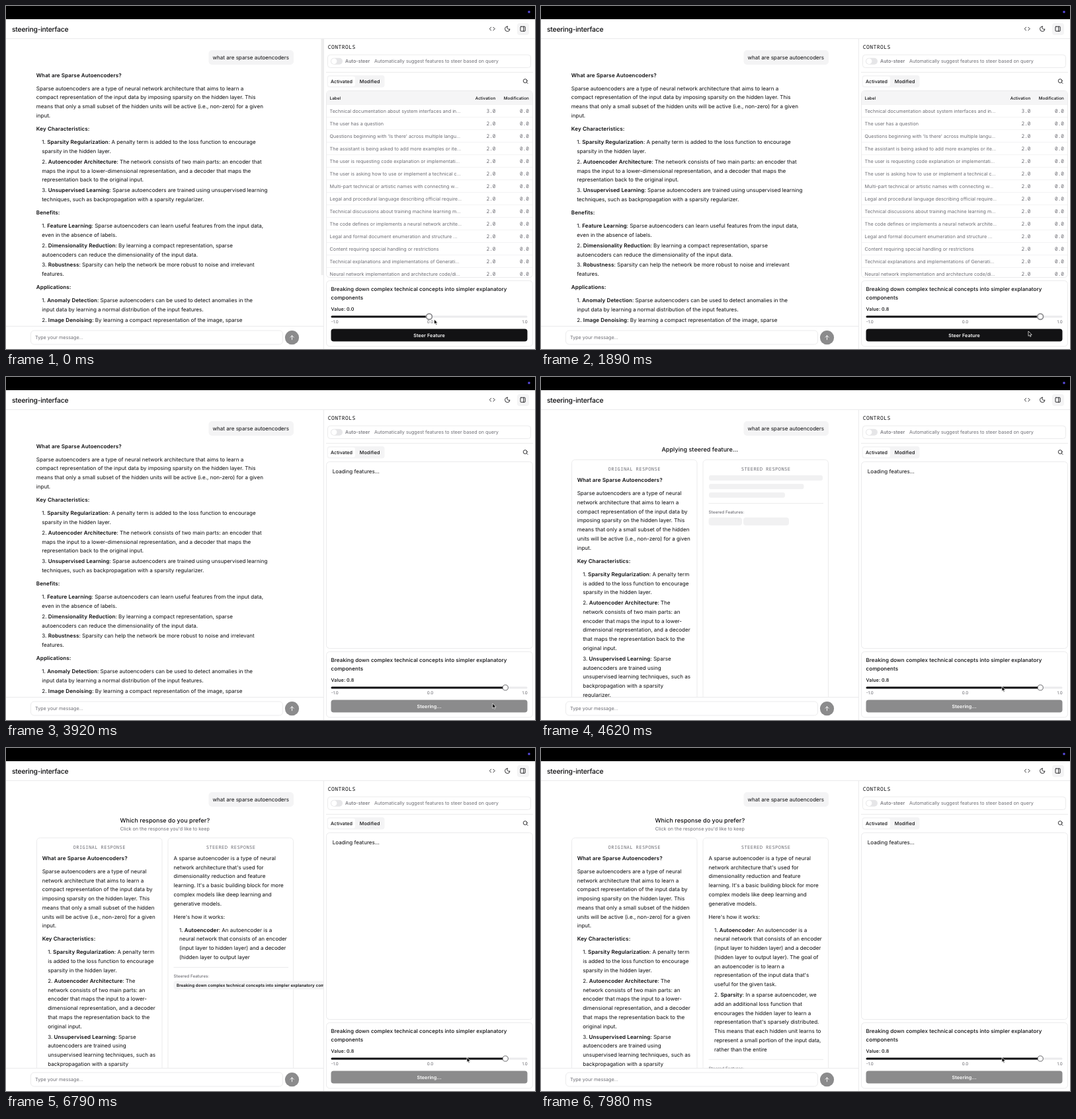
An HTML page that plays this animation: 800 by 520 pixels, repeating every 8 s.

```html
<!DOCTYPE html>
<html lang="en">
<head>
<meta charset="utf-8">
<title>steering-interface</title>
<style>
  html, body { margin: 0; width: 100%; height: 100%; overflow: hidden; background: #fff; }
  svg { display: block; width: 800px; height: 520px; }
  text { font-family: Inter, "Open Sans", sans-serif; white-space: pre; text-rendering: geometricPrecision; }
  .mono { font-family: "Noto Sans Mono", "Liberation Mono", monospace; }
  .line { fill: none; stroke: #ebebec; }
  .icon { fill: none; stroke: #18181b; stroke-width: .9; stroke-linecap: round; stroke-linejoin: round; }
  .soft { fill: #f4f4f5; }
  .bone { fill: #f1f1f2; }
</style>
</head>
<body>
<svg viewBox="0 0 800 520">
  <defs>
    <clipPath id="chatClip"><rect y="50" width="480" height="435.5"/></clipPath>
    <clipPath id="tableClip"><rect x="485" y="128" width="311" height="282.5"/></clipPath>
  </defs>
  <rect width="800" height="520" fill="#fff"/>
  <rect width="800" height="20"/>
  <circle cx="791" cy="9" r="1.8" fill="#5a4be0"/>
  <path class="line" d="M0 49.5H800M480.5 50V520M0 485.5H480M484 100.5H797"/>

  <rect class="soft" x="773" y="26" width="18" height="18" rx="4"/>
  <g class="icon">
    <path d="M733.6 32.2 731.2 34.6 733.6 37M736.8 32.2 739.2 34.6 736.8 37"/>
    <path d="M758.3 31.1A2.7 2.7 0 0 0 762 34.9 3.7 3.7 0 1 1 758.3 31.1Z"/>
    <rect x="778" y="31.2" width="7.2" height="7" rx=".8"/>
    <path d="M782.8 31.2V38.2"/>
    <circle cx="785.2" cy="113.6" r="2.9"/>
    <path d="M787.4 115.8 789 117.4"/>
  </g>

  <g id="chat" clip-path="url(#chatClip)">
    <rect id="edge" x="476.5" y="50" width="3.5" height="358" fill="#ededed"/>
    <rect class="soft" x="306.5" y="67" width="128.5" height="22" rx="5"/>
    <g id="single"></g>
    <g id="compare">
      <g id="cards">
        <rect class="line" x="46.5" y="125.5" width="189.5" height="500" rx="5"/>
        <rect class="line" x="245" y="125.5" width="189.5" height="500" rx="5"/>
      </g>
      <g id="skeleton">
        <rect class="bone" x="254" y="149" width="172" height="8" rx="3"/>
        <rect class="bone" x="254" y="162" width="143.5" height="8" rx="3"/>
        <rect class="bone" x="254" y="175" width="115" height="8" rx="3"/>
        <path class="line" d="M253.5 191.5H427"/>
        <rect class="bone" x="253.5" y="213" width="50.5" height="12" rx="4"/>
        <rect class="bone" x="306" y="213" width="69" height="12" rx="4"/>
      </g>
      <g id="answer">
        <g id="stream"></g>
        <g id="foot">
          <path class="line" d="M253.5 15.5H427"/>
          <rect class="soft" x="253.5" y="36" width="260" height="13" rx="4"/>
        </g>
      </g>
    </g>
  </g>
  <rect class="line" x="37.5" y="492" width="381" height="21" rx="5"/>
  <circle cx="432.5" cy="502.7" r="10.6" fill="#8b8b8c"/>
  <path d="M432.5 505.8V499.8M429.9 502.3 432.5 499.7 435.1 502.3" fill="none" stroke="#fff" stroke-width=".9" stroke-linecap="round"/>

  <g id="panel">
    <rect class="line" x="486.5" y="74" width="307" height="19.5" rx="4"/>
    <rect x="491" y="78.7" width="18" height="10" rx="5" fill="#e6e6e8"/>
    <circle cx="496.2" cy="83.7" r="4.2" fill="#fff"/>
    <rect class="soft" x="485.5" y="105" width="87" height="18.5" rx="4"/>
    <rect x="487" y="106.7" width="41" height="15" rx="3" fill="#fff"/>
    <rect class="line" x="484.5" y="128.5" width="312" height="283" rx="5"/>
    <g id="table" clip-path="url(#tableClip)">
      <rect x="485" y="129" width="311" height="20" fill="#f5f5f6"/>
    </g>
    <g id="loading"></g>
    <rect class="line" x="484.5" y="416.5" width="312" height="99.5" rx="5"/>
    <rect x="491.5" y="469.4" width="297" height="3" rx="1.5" fill="#ebebed"/>
    <rect id="fill" x="491.5" y="469.4" height="3" rx="1.5" fill="#121214"/>
    <circle id="halo" cy="470.9" r="5.4" fill="#b9b9bc"/>
    <circle id="thumb" cy="470.9" r="4.1" fill="#fff" stroke="#4a4a4d" stroke-width=".8"/>
    <rect id="button" x="491.5" y="489.5" width="297" height="19" rx="4"/>
  </g>
  <path id="cursor" d="M0 0V7.4L1.7 5.8 2.8 8.4 4.1 7.9 3 5.4H5.3Z" stroke="#fff" stroke-width=".7"/>
</svg>
<script>
const $ = id => document.getElementById(id);
const NS = 'http://www.w3.org/2000/svg';
const INK = '#0c0c0e', GRAY = '#6c6c73';
const BODY = 8.05, SMALL = 7.18, TINY = 6.27;
const LOOP = 8000, STEP = 70;

const make = (parent, tag, attrs) => {
  const el = document.createElementNS(NS, tag);
  for (const k in attrs) el.setAttribute(k, attrs[k]);
  return parent.appendChild(el);
};

const MED = { 'font-weight': 500, 'letter-spacing': '.008em' };
const BOLD = { 'font-weight': 600, 'letter-spacing': '.013em' };
const MID = { 'text-anchor': 'middle' };
const END = { 'text-anchor': 'end' };
const MONO = { class: 'mono' };
const WIDE = { ...MONO, 'letter-spacing': '.05em' };

// Parts between ** are bold.
const setText = (el, str) => {
  el.textContent = '';
  str.split('**').forEach((part, i) => {
    if (part) make(el, 'tspan', i % 2 ? BOLD : {}).textContent = part;
  });
};

// y is the middle of the capitals.
const label = (parent, x, y, str, size = BODY, fill = INK, extra = {}) => {
  const el = make(parent, 'text', { x, y: y + size * .36, 'font-size': size, fill, ...extra });
  setText(el, str);
  return el;
};

// Blocks are "kind|line|line"; list items are indented and set closer.
const flow = (x, y, blocks) => {
  const out = [];
  let before = '';
  for (const block of blocks) {
    const [kind, ...lines] = block.split('|');
    if (before) y += kind === 'li' && before === 'li' ? 15.9 : 20.1;
    lines.forEach((str, i) => {
      if (i) y += 13.75;
      out.push({ x: kind === 'li' ? x + 8.5 : x, y, str });
    });
    before = kind;
  }
  return out;
};
const write = (parent, lines) => lines.map(l => label(parent, l.x, l.y, l.str));

const wideAnswer = [
  'h|**What are Sparse Autoencoders?**',
  'p|Sparse autoencoders are a type of neural network architecture that aims to learn a|compact representation of the input data by imposing sparsity on the hidden layer. This|means that only a small subset of the hidden units will be active (i.e., non-zero) for a given|input.',
  'h|**Key Characteristics:**',
  'li|1. **Sparsity Regularization**: A penalty term is added to the loss function to encourage|sparsity in the hidden layer.',
  'li|2. **Autoencoder Architecture**: The network consists of two main parts: an encoder that|maps the input to a lower-dimensional representation, and a decoder that maps the|representation back to the original input.',
  'li|3. **Unsupervised Learning**: Sparse autoencoders are trained using unsupervised learning|techniques, such as backpropagation with a sparsity regularizer.',
  'h|**Benefits:**',
  'li|1. **Feature Learning**: Sparse autoencoders can learn useful features from the input data,|even in the absence of labels.',
  'li|2. **Dimensionality Reduction**: By learning a compact representation, sparse|autoencoders can reduce the dimensionality of the input data.',
  'li|3. **Robustness**: Sparsity can help the network be more robust to noise and irrelevant|features.',
  'h|**Applications:**',
  'li|1. **Anomaly Detection**: Sparse autoencoders can be used to detect anomalies in the|input data by learning a normal distribution of the input features.',
  'li|2. **Image Denoising**: By learning a compact representation of the image, sparse'
];
const narrowAnswer = [
  'h|**What are Sparse Autoencoders?**',
  'p|Sparse autoencoders are a type of neural|network architecture that aims to learn a|compact representation of the input data by|imposing sparsity on the hidden layer. This|means that only a small subset of the hidden|units will be active (i.e., non-zero) for a given|input.',
  'h|**Key Characteristics:**',
  'li|1. **Sparsity Regularization**: A penalty term|is added to the loss function to encourage|sparsity in the hidden layer.',
  'li|2. **Autoencoder Architecture**: The|network consists of two main parts: an|encoder that maps the input to a lower-|dimensional representation, and a decoder|that maps the representation back to the|original input.',
  'li|3. **Unsupervised Learning**: Sparse|autoencoders are trained using|unsupervised learning techniques, such as|backpropagation with a sparsity|regularizer.'
];
const steeredAnswer = [
  "p|A sparse autoencoder is a type of neural|network architecture that's used for|dimensionality reduction and feature|learning. It's a basic building block for more|complex models like deep learning and|generative models.",
  "p|Here's how it works:",
  "li|1. **Autoencoder**: An autoencoder is a|neural network that consists of an encoder|(input layer to hidden layer) and a decoder|(hidden layer to output layer). The goal of|an autoencoder is to learn a|representation of the input data that's|useful for the given task.",
  "li|2. **Sparsity**: In a sparse autoencoder, we|add an additional loss function that|encourages the hidden layer to learn a|representation that's sparsely distributed.|This means that each hidden unit learns to|represent a small portion of the input data,|rather than the entire"
];
const features = [
  'Technical documentation about system interfaces and in...',
  'The user has a question',
  "Questions beginning with 'Is there' across multiple langu...",
  'The assistant is being asked to add more examples or ite...',
  'The user is requesting code explanation or implementati...',
  'The user is asking how to use or implement a technical c...',
  'Multi-part technical or artistic names with connecting w...',
  'Legal and procedural language describing official require...',
  'Technical discussions about training machine learning m...',
  'The code defines or implements a neural network archite...',
  'Legal and formal document enumeration and structure ...',
  'Content requiring special handling or restrictions',
  'Technical explanations and implementations of Generati...',
  'Neural network implementation and architecture code/di...'
];

// Header and chat
const stage = document.querySelector('svg');
label(stage, 9, 34.8, 'steering-interface', 10.35, INK, { ...MED, 'letter-spacing': '-.022em' });
label(stage, 44, 502.5, 'Type your message...', SMALL, GRAY);
label($('chat'), 312.5, 78.2, 'what are sparse autoencoders');
write($('single'), flow(45.8, 104.7, wideAnswer));

const applying = label($('compare'), 240.3, 109.5, 'Applying steered feature...', 8.95, INK, { ...MED, ...MID });
label($('answer'), 240.3, 109.5, 'Which response do you prefer?', 8.95, INK, { ...MED, ...MID });
label($('answer'), 240.3, 122.3, "Click on the response you'd like to keep", SMALL, GRAY, MID);
label($('cards'), 101.6, 139.5, 'ORIGINAL RESPONSE', SMALL, GRAY, WIDE);
label($('cards'), 302.8, 139.5, 'STEERED RESPONSE', SMALL, GRAY, WIDE);
write($('cards'), flow(54.7, 156.1, narrowAnswer));
label($('skeleton'), 253.5, 204.6, 'Steered Features:', TINY, GRAY, MED);
label($('foot'), 253.5, 28.5, 'Steered Features:', TINY, GRAY, MED);
label($('foot'), 258, 42.6, '**Breaking down complex technical concepts into simpler explanatory components**', 6.2);

const streamLines = flow(253.5, 166.9, steeredAnswer);
const streamTexts = write($('stream'), streamLines);

// Controls
const panel = $('panel');
label(panel, 486.8, 62.6, 'CONTROLS', BODY, INK, WIDE);
label(panel, 513, 83.6, 'Auto-steer', SMALL, GRAY, MED);
label(panel, 557, 83.6, 'Automatically suggest features to steer based on query', SMALL, GRAY);
label(panel, 491, 114.2, 'Activated', SMALL, INK, MED);
label(panel, 534.8, 114.2, 'Modified', SMALL, INK, MED);
label($('loading'), 493.7, 143.5, 'Loading features...');
label($('table'), 489.6, 139.3, 'Label', TINY, INK, MED);
label($('table'), 740.3, 139.3, 'Activation', TINY, INK, { ...MED, ...END });
label($('table'), 790.8, 139.3, 'Modification', TINY, INK, { ...MED, ...END });
features.forEach((name, i) => {
  const y = 159.4 + 19 * i;
  make($('table'), 'path', { d: `M485 ${y - 9.9}H796`, stroke: '#f3f3f4' });
  label($('table'), 489.6, y, name, SMALL, GRAY);
  label($('table'), 740.5, y, i ? '2.0' : '3.0', 7.8, GRAY, { ...MONO, ...END });
  label($('table'), 791, y, '0.0', 7.8, GRAY, { ...MONO, ...END });
});
label(panel, 491.5, 429.2, 'Breaking down complex technical concepts into simpler explanatory', BODY, INK, MED);
label(panel, 491.5, 442, 'components', BODY, INK, MED);
const valueText = label(panel, 491.5, 459.6, 'Value: 0.0', SMALL, INK, MED);
label(panel, 491.8, 479.2, '-1.0', TINY, GRAY);
label(panel, 641.5, 479.2, '0.0', TINY, GRAY, MID);
label(panel, 788.6, 479.2, '1.0', TINY, GRAY, END);
const buttonText = label(panel, 640, 499, 'Steer Feature', SMALL, '#fff', { ...BOLD, ...MID });

// Timeline
const GRAB = 280, RELEASE = 1540, CLICK = 2450, APPLY = 4200, ANSWER = 5530;
const cursorPath = [
  [0, 647.5, 475], [GRAB, 640, 470], [840, 735, 470], [910, 734, 470], [1050, 734, 470],
  [RELEASE, 755, 470], [1610, 755, 470], [1890, 737, 493], [2240, 736, 494.7],
  [3850, 736, 494.7], [3990, 735.5, 495], [4130, 735.5, 495], [4550, 697, 469], [LOOP, 697, 469]
];
const wordPath = [[ANSWER, 1], [5880, 18], [6790, 63], [7980, 127], [LOOP, 127]];

const at = (path, t) => {
  let i = 1;
  while (i < path.length - 1 && path[i][0] < t) i++;
  const a = path[i - 1], b = path[i];
  const k = Math.min(1, Math.max(0, (t - a[0]) / (b[0] - a[0])));
  return a.slice(1).map((v, j) => v + (b[j + 1] - v) * k);
};
const show = (el, on) => el.setAttribute('display', on ? 'inline' : 'none');

const drawStream = t => {
  let left = Math.round(at(wordPath, t)[0]);
  let last = streamLines[0].y;
  streamLines.forEach((line, i) => {
    const words = line.str.split(' ');
    let str = words.slice(0, Math.max(0, left)).join(' ');
    // A closing bracket arrives together with the word after it.
    if (left > 0 && left < words.length) str = str.replace(/\)\.$/, '');
    if (left > 0) last = line.y;
    left -= words.length;
    setText(streamTexts[i], str);
  });
  $('foot').setAttribute('transform', `translate(0 ${last})`);
};

const draw = t => {
  const [cx, cy] = at(cursorPath, t);
  $('cursor').setAttribute('transform', `translate(${cx} ${cy})`);

  const tenths = t < GRAB ? 0 : Math.round((at(cursorPath, Math.min(t, RELEASE))[0] - 640) / 14.4);
  const x = 640 + 14.4 * tenths;
  $('fill').setAttribute('width', x - 491.5);
  $('thumb').setAttribute('cx', x);
  $('halo').setAttribute('cx', x);
  valueText.textContent = 'Value: ' + (tenths / 10).toFixed(1);

  const busy = t >= CLICK, applied = t >= APPLY, answering = t >= ANSWER;
  show($('edge'), t < STEP);
  show($('halo'), !busy);
  show($('table'), !busy);
  show($('loading'), busy);
  $('button').setAttribute('fill', busy ? '#8b8b8c' : '#121214');
  buttonText.textContent = busy ? 'Steering...' : 'Steer Feature';

  show($('single'), !applied);
  show($('compare'), applied);
  show(applying, !answering);
  show($('skeleton'), !answering);
  show($('answer'), answering);
  $('cards').setAttribute('transform', `translate(0 ${answering ? 10.7 : 0})`);
  if (answering) drawStream(t);
};

const start = performance.now();
let shown = -1;
const tick = () => {
  const t = Math.floor(((performance.now() - start) % LOOP) / STEP) * STEP;
  if (t !== shown) draw(shown = t);
  requestAnimationFrame(tick);
};
tick();
</script>
</body>
</html>
```
